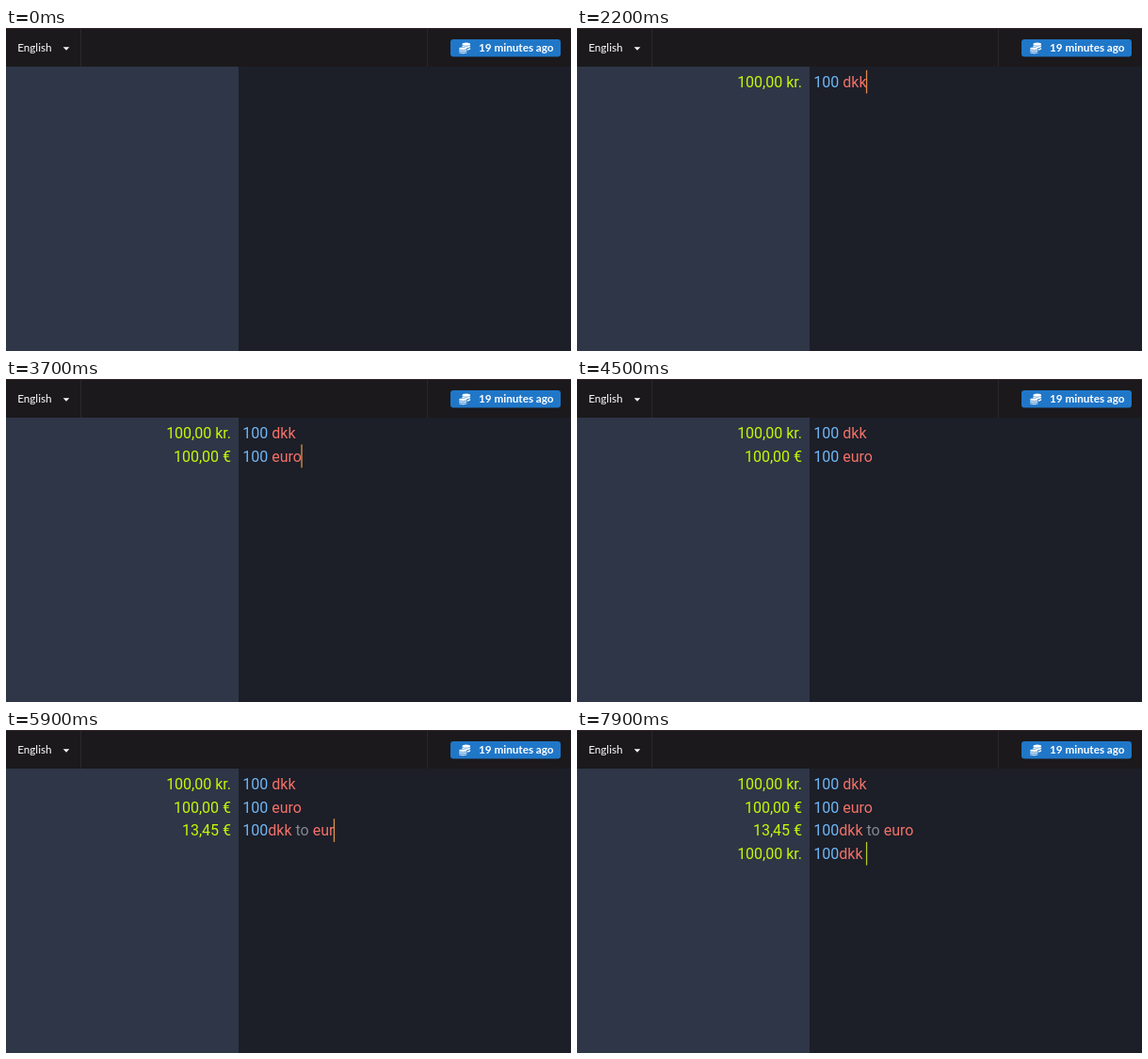
Write an HTML page that moves like this. It is 600 px wide and 343 px high and loops after 8 s.

```html
<!DOCTYPE html>
<html lang="en">
<head>
<meta charset="utf-8">
<title>Currency calculator</title>
<style>
  html, body { margin: 0; width: 100%; height: 100%; overflow: hidden; background: #1c1e28; }
  svg { display: block; width: 100vw; height: 100vh; }
  text { white-space: pre; }
  .ui { font: 11.7px Lato, sans-serif; fill: #fff; }
  .bold { font-weight: 700; }
  .code { font: 16px Roboto, sans-serif; }
  .result { fill: #c5f807; text-anchor: end; }
  .number { fill: #6fb7f6; }
  .unit { fill: #f27167; }
  .word { fill: #85878e; }
</style>
</head>
<body>
<svg viewBox="0 0 600 343" preserveAspectRatio="none">
  <rect width="600" height="343" fill="#1c1e28"/>
  <rect y="41" width="247" height="302" fill="#2f3647"/>
  <rect width="600" height="41" fill="#1b191b"/>
  <rect width="600" height="1" fill="#35242a"/>
  <path d="M79.5 1V41M447.5 1V41" stroke="#2a282a"/>
  <text class="ui" x="12.2" y="25.2">English</text>
  <path d="M60.7 20.3H67.3L64 23.8Z" fill="#fff"/>
  <rect x="472" y="12" width="117" height="18.5" rx="3.2" fill="#2077c8"/>
  <g fill="#fff">
    <ellipse cx="488.8" cy="17.2" rx="4.3" ry="1.6"/>
    <path d="M484.5 18.4q4.3 2 8.6 0v1.6q-1.6 1.2-4.2 1.2q-2-1.1-4.4-1.2z"/>
    <path d="M490 22.1q2-.2 3.1-1v1.5q-1 .9-3.1 1.1z"/>
    <ellipse cx="485.3" cy="22" rx="4.1" ry="1.4"/>
    <path d="M481.2 23.3q4.1 1.8 8.2 0v1.1q-4.1 1.8-8.2 0zM481.2 25.4q4.1 1.8 8.2 0v.9q-4.1 1.8-8.2 0z"/>
  </g>
  <text class="ui bold" x="502" y="25.2">19 minutes ago</text>
  <g id="sheet" class="code"></g>
  <rect id="caret" width="1.3" height="24.7"/>
</svg>
<script>
const LOOP = 8000, BLINK = 530;
const LEFT = 251.3, RIGHT = 239, TOP = 45.2, PITCH = 24.7;

// start: the caret enters the line; keys: when each character is typed
const lines = [
  { start: 300, text: '100 dkk', keys: [500, 700, 900, 1100, 1400, 1600, 1800] },
  { start: 2300, text: '100 euro', keys: [2500, 2600, 2700, 2800, 3000, 3200, 3300, 3500] },
  { start: 4600, text: '100dkk to euro',
    keys: [4700, 4800, 4900, 5100, 5200, 5300, 5400, 5500, 5600, 5700, 5800, 5800, 5900, 6100] },
  { start: 6800, text: '100dkk ', keys: [7000, 7200, 7400, 7500, 7600, 7800, 7900] }
];
const units = {
  dkk: { sign: 'kr.', rate: 0.1345 },
  eur: { sign: '€', rate: 1 },
  euro: { sign: '€', rate: 1 }
};

const sheet = document.getElementById('sheet');
const caret = document.getElementById('caret');

function add(parent, tag, attrs) {
  const node = document.createElementNS('http://www.w3.org/2000/svg', tag);
  for (const name in attrs) node.setAttribute(name, attrs[name]);
  return parent.appendChild(node);
}

lines.forEach((line, i) => {
  const y = TOP + 17.8 + i * PITCH;
  line.result = add(sheet, 'text', { class: 'result', x: RIGHT, y });
  line.input = add(sheet, 'text', { x: LEFT, y });
});

function evaluate(text) {
  const amount = text.match(/^\d+/);
  if (!amount) return '';
  const known = (text.match(/[a-z]+/g) || []).map(word => units[word]).filter(Boolean);
  if (!known.length) return amount[0];
  const from = known[0], to = known[known.length - 1];
  const value = amount[0] * from.rate / to.rate;
  return value.toFixed(2).replace('.', ',') + ' ' + to.sign;
}

function tokenClass(token) {
  if (/\d/.test(token)) return 'number';
  return units[token] ? 'unit' : 'word';
}

function showLine(line, text) {
  if (line.shown === text) return;
  line.shown = text;
  line.result.textContent = evaluate(text);
  line.input.textContent = '';
  for (const token of text.match(/\d+|[a-z]+|\s+/g) || []) {
    add(line.input, 'tspan', { class: tokenClass(token) }).textContent = token;
  }
}

function showCaret(t, row, lastKey) {
  const visible = row >= 0 && Math.floor((t - lastKey) / BLINK) % 2 === 0;
  caret.style.display = visible ? '' : 'none';
  if (!visible) return;
  const line = lines[row];
  caret.setAttribute('x', LEFT - 0.6 + (line.shown ? line.input.getComputedTextLength() : 0));
  caret.setAttribute('y', TOP - 0.4 + row * PITCH);
  // the colour swings between salmon and lime
  const mix = (1 - Math.cos((t - 7200) / 1600 * 2 * Math.PI)) / 2;
  const rgb = [[232, 125, 84], [178, 204, 40]];
  caret.setAttribute('fill', `rgb(${rgb[0].map((c, i) => Math.round(c + (rgb[1][i] - c) * mix))})`);
}

function draw(t) {
  let row = -1, lastKey = 0;
  lines.forEach((line, i) => {
    const typed = line.keys.filter(key => key <= t);
    showLine(line, line.text.slice(0, typed.length));
    if (t >= line.start) {
      row = i;
      lastKey = typed.length ? typed[typed.length - 1] : line.start;
    }
  });
  showCaret(t, row, lastKey);
}

const begin = performance.now();
function tick() {
  draw((performance.now() - begin) % LOOP);
  requestAnimationFrame(tick);
}
tick();
</script>
</body>
</html>
```
